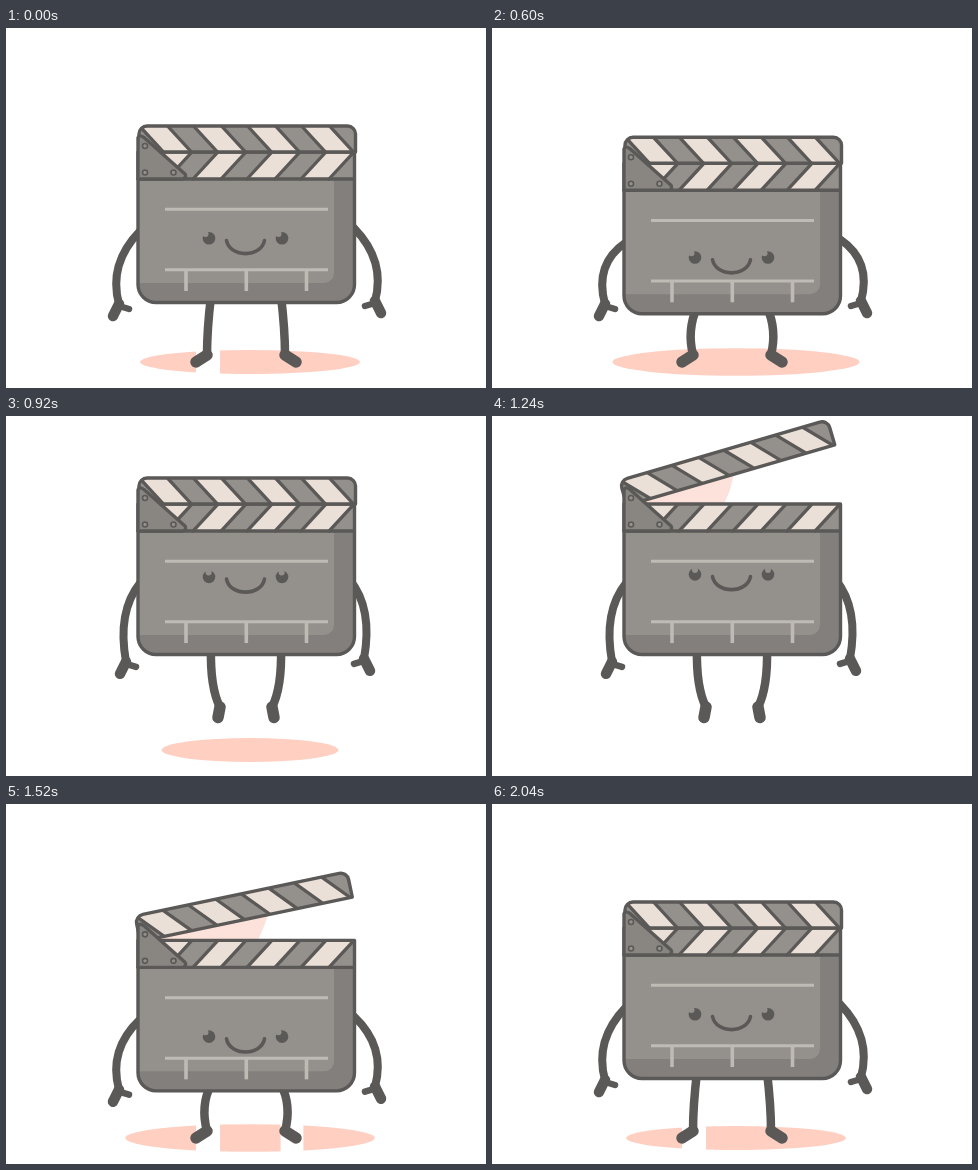
Animation, 480 px wide and 360 px high, one loop 2.6 s. Source, as an HTML page with a canvas:

```html
<!DOCTYPE html>
<html lang="en">
<head>
<meta charset="utf-8">
<title>Jumping clapperboard</title>
<style>
html, body { margin: 0; width: 100%; height: 100%; overflow: hidden; background: #fff; }
canvas { display: block; width: 480px; height: 360px; }
</style>
</head>
<body>
<canvas id="stage"></canvas>
<script>
const LOOP = 2600, STEP = 40;
const DIP = 220, LEAP = 750, LAND = 1410, RISEN = 1730, REST = 2040;
const INK = '#5b5957', GRAY = '#94908c', SHADE = '#827f7c', PLATE = '#898682';
const CREAM = '#ebe0d7', CHALK = '#bebab4', PINK = '#ffcfc2', BLUSH = '#fde2db';

const canvas = document.getElementById('stage');
const ctx = canvas.getContext('2d');
const dpr = window.devicePixelRatio || 1;
canvas.width = 480 * dpr;
canvas.height = 360 * dpr;

const clamp = u => Math.min(1, Math.max(0, u));
const mix = (a, b, u) => a + (b - a) * u;
// Half sine between two times, zero outside
const arc = (t, a, b) => Math.sin(Math.PI * clamp((t - a) / (b - a)));
// Smooth step from 0 to 1
const ramp = (t, a, b) => {
  const u = clamp((t - a) / (b - a));
  return u * u * (3 - 2 * u);
};

function poseAt(t) {
  const u = clamp((t - LEAP) / (LAND - LEAP));
  const hop = 47 * 4 * u * (1 - u);
  const squat = arc(t, LAND, RISEN);
  const up = ramp(t, 760, 960) - ramp(t, 1300, 1500);
  return {
    dy: 14.5 * arc(t, DIP, LEAP) - hop + 14 * squat - 2 * arc(t, RISEN, REST),
    hop,
    squat,
    up,
    dangle: ramp(t, 640, 900) - ramp(t, 1320, 1420),
    face: 8 * ramp(t, 240, 400) - 24 * up + 2 * ramp(t, 1300, 1500) - 10 * ramp(t, 1600, 2000),
    angle: 19 * Math.PI / 180 * arc(t, 1040, 1650),
    blush: 232 + 20 * ramp(t, 1240, 1520),
    footGap: 12 - 12 * (ramp(t, 240, 600) - ramp(t, 1400, 1500)),
    sideGap: 12 * arc(t, 1400, 1700),
    grounded: t <= 1040 || t >= 1330
  };
}

function line(points, width, color = INK) {
  ctx.beginPath();
  points.forEach(([x, y]) => ctx.lineTo(x, y));
  ctx.lineWidth = width;
  ctx.strokeStyle = color;
  ctx.stroke();
}

function curve(a, c, b, width) {
  ctx.beginPath();
  ctx.moveTo(...a);
  ctx.quadraticCurveTo(...c, ...b);
  outline(width);
}

function poly(points, fill) {
  ctx.beginPath();
  points.forEach(([x, y]) => ctx.lineTo(x, y));
  ctx.closePath();
  ctx.fillStyle = fill;
  ctx.fill();
}

function dot(x, y, r, fill) {
  ctx.beginPath();
  ctx.arc(x, y, r, 0, 7);
  ctx.fillStyle = fill;
  ctx.fill();
}

function box(x, y, w, h, radii) {
  ctx.beginPath();
  ctx.roundRect(x, y, w, h, radii);
}

function outline(width = 3.4) {
  ctx.lineWidth = width;
  ctx.strokeStyle = INK;
  ctx.stroke();
}

function drawShadow({ dy, footGap, sideGap, grounded }) {
  if (!grounded) return;
  const squash = Math.max(dy, 0);
  ctx.beginPath();
  ctx.ellipse(244, 334, 110 + .6 * (dy + squash), 12 + .15 * squash, 0, 0, 7);
  ctx.fillStyle = PINK;
  ctx.fill();
  ctx.fillStyle = '#fff';
  ctx.fillRect(202 - footGap, 316, 2 * footGap, 34);
  ctx.fillRect(286 - sideGap, 316, 2 * sideGap, 34);
}

function drawLegs({ dy, hop, dangle }) {
  const knee = [mix(201, 204, dangle) - .55 * Math.max(dy, 0), 302 - .85 * hop];
  const ankle = [mix(201, 214, dangle), 327 - hop];
  const toe = [ankle[0] + mix(-11, -2, dangle), ankle[1] + mix(7, 10.5, dangle)];
  for (const mirrored of [false, true]) {
    const place = ([x, y]) => [mirrored ? 480 - x : x, y];
    curve(place([205, 268 + dy]), place(knee), place(ankle), 8.5);
    line([place(ankle), place(toe)], 11.5);
  }
}

function drawArms({ dy, hop, squat, dangle }) {
  const x = mix(113, 120, dangle), y = 276 - .84 * hop + 11 * squat;
  const elbow = [mix(102, 111, dangle), y - mix(40, 50, dangle)];
  for (const mirrored of [false, true]) {
    const place = ([px, py]) => mirrored ? [mix(482, 478, dangle) - px, py - 3] : [px, py];
    curve(place([134, 203 + dy]), place(elbow), place([x, y]), 8);
    line([place([x, y]), place([x - 6, y + 12])], 10.5);
    line([place([x, y + 2]), place([x + 10, y + 5])], 6.5);
  }
}

// Slanted bands; lean 1 runs down to the right, -1 to the left
function stripes(y, lean) {
  const top = lean > 0 ? -25 : 0, bottom = -25 - top;
  for (let x = 158; x < 380; x += 54) {
    const left = [[x + top, y], [x + bottom, y + 27]];
    const right = left.map(([px, py]) => [px + 28, py]);
    poly([...left, ...right.slice().reverse()], CREAM);
    line(left, 3.3);
    line(right, 3.3);
  }
}

function drawBody() {
  const shape = () => box(132, 124, 216.5, 150.5, [0, 0, 18, 18]);
  ctx.save();
  shape();
  ctx.fillStyle = SHADE;
  ctx.fill();
  ctx.clip();
  box(120, 140, 208, 115, [0, 0, 10, 0]);
  ctx.fillStyle = GRAY;
  ctx.fill();
  ctx.fillRect(132, 124, 217, 27);
  stripes(124, -1);
  ctx.restore();
  line([[132, 151], [348, 151]], 3.4);
  shape();
  outline();

  ctx.lineCap = 'butt';
  for (const y of [181.3, 241.8]) line([[159, y], [322, y]], 3, CHALK);
  for (const x of [180, 240.3, 300.5]) line([[x, 242], [x, 263]], 3.6, CHALK);
  ctx.lineCap = 'round';
}

function drawFace({ face, up }) {
  ctx.save();
  ctx.translate(0, face);
  for (const x of [203, 276]) {
    dot(x, 210.3, 6.3, INK);
    dot(x - 3.5 * (1 - up), 206, 3, GRAY);
  }
  ctx.beginPath();
  ctx.moveTo(220.5, 212.5);
  ctx.bezierCurveTo(224, 230, 255, 230, 258.5, 212.5);
  outline(3.6);
  ctx.restore();
}

function drawStick({ angle }) {
  const shape = () => box(133, 98, 216.5, 26, [8, 8, 0, 0]);
  ctx.save();
  ctx.translate(139, 118);
  ctx.rotate(-angle);
  ctx.translate(-139, -118);
  ctx.save();
  shape();
  ctx.fillStyle = GRAY;
  ctx.fill();
  ctx.clip();
  stripes(97.5, 1);
  ctx.restore();
  shape();
  outline();
  ctx.restore();
}

function drawPlate() {
  ctx.beginPath();
  ctx.moveTo(132, 151);
  ctx.lineTo(132, 110);
  ctx.quadraticCurveTo(133, 106, 138, 109.5);
  ctx.lineTo(179, 146);
  ctx.quadraticCurveTo(181, 149, 177, 151);
  ctx.closePath();
  ctx.fillStyle = PLATE;
  ctx.fill();
  outline();
  for (const [x, y] of [[139, 118], [139, 144.5], [167.5, 144.5]]) {
    dot(x, y, 2.5, GRAY);
    outline(1.6);
  }
}

// Soft tint in the open mouth of the clapper
function drawBlush({ angle, blush: x }) {
  if (angle < .002) return;
  poly([[145, 124], [x, 124], [x + 6, 110], [x + 10, 124 - (x - 129) * Math.tan(angle)]], BLUSH);
}

function draw(t) {
  const pose = poseAt(t);
  ctx.setTransform(dpr, 0, 0, dpr, 0, 0);
  ctx.fillStyle = '#fff';
  ctx.fillRect(0, 0, 480, 360);
  ctx.lineCap = ctx.lineJoin = 'round';
  drawShadow(pose);
  drawLegs(pose);
  drawArms(pose);
  ctx.translate(0, pose.dy);
  drawBlush(pose);
  drawBody();
  drawFace(pose);
  drawStick(pose);
  drawPlate();
}

const start = performance.now();
function tick() {
  const t = (performance.now() - start) % LOOP;
  draw(Math.floor(t / STEP) * STEP);
  requestAnimationFrame(tick);
}
tick();
</script>
</body>
</html>
```
